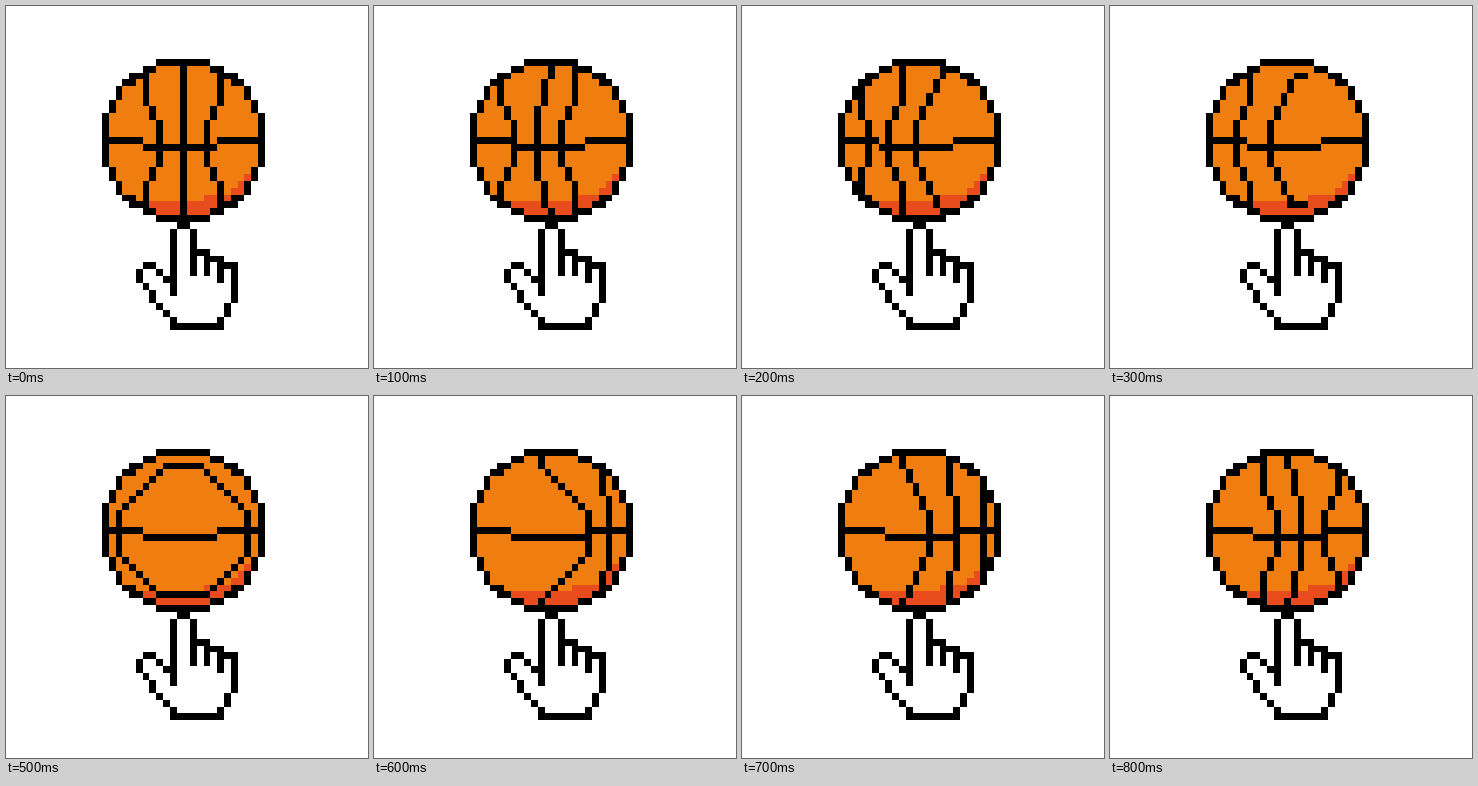
Animation, 362 px wide and 362 px high, one loop 0.9 s. Source, as an HTML page with a canvas:

```html
<!DOCTYPE html>
<html lang="en">
<head>
<meta charset="utf-8">
<title>Spinning basketball</title>
<style>
html, body { margin: 0; width: 100%; height: 100%; overflow: hidden; background: #fff; }
canvas { display: block; }
</style>
</head>
<body>
<canvas id="stage" width="362" height="362"></canvas>
<script>
const ctx = document.getElementById('stage').getContext('2d');
const CELL = 6.78, LEFT = 96, TOP = 53;
const SIZE = 24, RADIUS = 12.25, STEP = 100, POSES = 9;
const BLACK = '#000', ORANGE = '#ef7d0f', RED = '#e84c1c';

// Each seam appears on the right at its birth step and drifts left.
// Keys: step of life, column of the bulge, signed distance to the tips.
const SEAMS = [
  { birth: 5, keys: [[0, 21, -10], [2, 13, -4], [3, 10, -2], [5, 6, -2], [6, 4, -1]] },
  { birth: 6, straight: true,
    keys: [[0, 20, -1], [1, 17, -1], [2, 13.5, -2], [4, 9.5, 2], [6, 4, 2], [7, 2, 2]] },
  { birth: 7, keys: [[0, 21, 0], [1, 17, 2], [3, 13, 2], [5, 9, 5], [7, 2, 10]] }
];

// Hand: corner cells of straight or diagonal strokes
const HAND = [
  [[18, 30], [19, 30], [19, 35], [18, 36], [18, 37], [17, 38], [17, 39], [10, 39],
   [10, 38], [7, 35], [7, 34], [5, 32], [5, 31], [6, 30], [7, 30], [9, 32],
   [10, 33], [10, 34], [10, 25], [11, 24], [12, 24], [13, 25], [13, 31]],
  [[14, 28], [15, 28], [15, 31]],
  [[16, 29], [17, 29], [17, 32]]
];

const px = c => Math.round(LEFT + c * CELL);
const py = r => Math.round(TOP + r * CELL);
const lerp = (a, b, u) => a + (b - a) * u;

function block(c, r, w = 1, h = 1) {
  ctx.fillRect(px(c), py(r), px(c + w) - px(c), py(r + h) - py(r));
}

// First column of the ball in a row
function inset(r) {
  const d = r - (SIZE - 1) / 2;
  return SIZE / 2 - Math.round(Math.sqrt(Math.max(0, RADIUS ** 2 - d * d)));
}

function ball() {
  for (let r = 0; r < SIZE; r++) {
    for (let c = inset(r); c < SIZE - inset(r); c++) {
      const shaded = r > 20 || (r > 19 && c > 14) || c + r > 37;
      ctx.fillStyle = shaded ? RED : ORANGE;
      block(c, r);
    }
  }
}

function outline() {
  for (let r = 0; r < SIZE / 2; r++) {
    const c = inset(r);
    const w = Math.max(r < 4 ? 2 : 1, inset(r - 1) - c);
    for (const y of [r, SIZE - 1 - r]) {
      block(c, y, w);
      block(SIZE - c - w, y, w);
    }
  }
}

function seamCell(c, r) {
  if (c >= inset(r) && c + 1 <= SIZE - inset(r)) block(c, r);
}

// The seam steps outwards by one column every few rows above and below its bulge
function arc(bulge, reach, straight) {
  const n = Math.abs(reach), dir = Math.sign(reach);
  const run = straight ? 4 : n > 5 ? 1 : 2;
  const start = straight ? 7 : 9;
  const offset = r => Math.min(n, Math.max(0, Math.ceil((start - r) / run)));
  const closed = offset(2) < n;
  const top = closed ? 2 : 1;
  for (let r = top; r <= SIZE / 2; r++) {
    const last = closed && r === top ? n : offset(r);
    for (let k = offset(r); k <= last; k++) {
      seamCell(bulge + dir * k, r);
      seamCell(bulge + dir * k, Math.min(SIZE - r, SIZE - 1 - top));
    }
  }
}

function seam({ birth, keys, straight }, pose) {
  const age = (pose - birth + POSES) % POSES;
  const i = keys.findIndex(key => key[0] >= age);
  if (i < 0) return;
  const b = keys[i], a = keys[Math.max(0, i - 1)];
  const u = a === b ? 0 : (age - a[0]) / (b[0] - a[0]);
  const bulge = Math.round(lerp(a[1], b[1], u) * 2) / 2;
  arc(bulge, Math.round(lerp(a[2], b[2], u)), straight && bulge > 8);
}

function equator(pose) {
  const split = pose > 6 ? 7 : 6;
  block(1, 11.5, split - 1);
  block(split, 12.5, 17 - split);
  block(17, 11.5, 6);
}

function stroke(points) {
  let [c, r] = points[0];
  block(c, r);
  for (const [c2, r2] of points) {
    while (c !== c2 || r !== r2) {
      c += Math.sign(c2 - c);
      r += Math.sign(r2 - r);
      block(c, r);
    }
  }
}

function draw(pose) {
  ctx.fillStyle = '#fff';
  ctx.fillRect(0, 0, 362, 362);
  ball();
  ctx.fillStyle = BLACK;
  SEAMS.forEach(s => seam(s, pose));
  equator(pose);
  outline();
  HAND.forEach(stroke);
}

const begin = performance.now();
function tick() {
  const t = Math.max(0, performance.now() - begin);
  draw(Math.floor(t / STEP) % POSES);
  requestAnimationFrame(tick);
}
tick();
</script>
</body>
</html>
```
